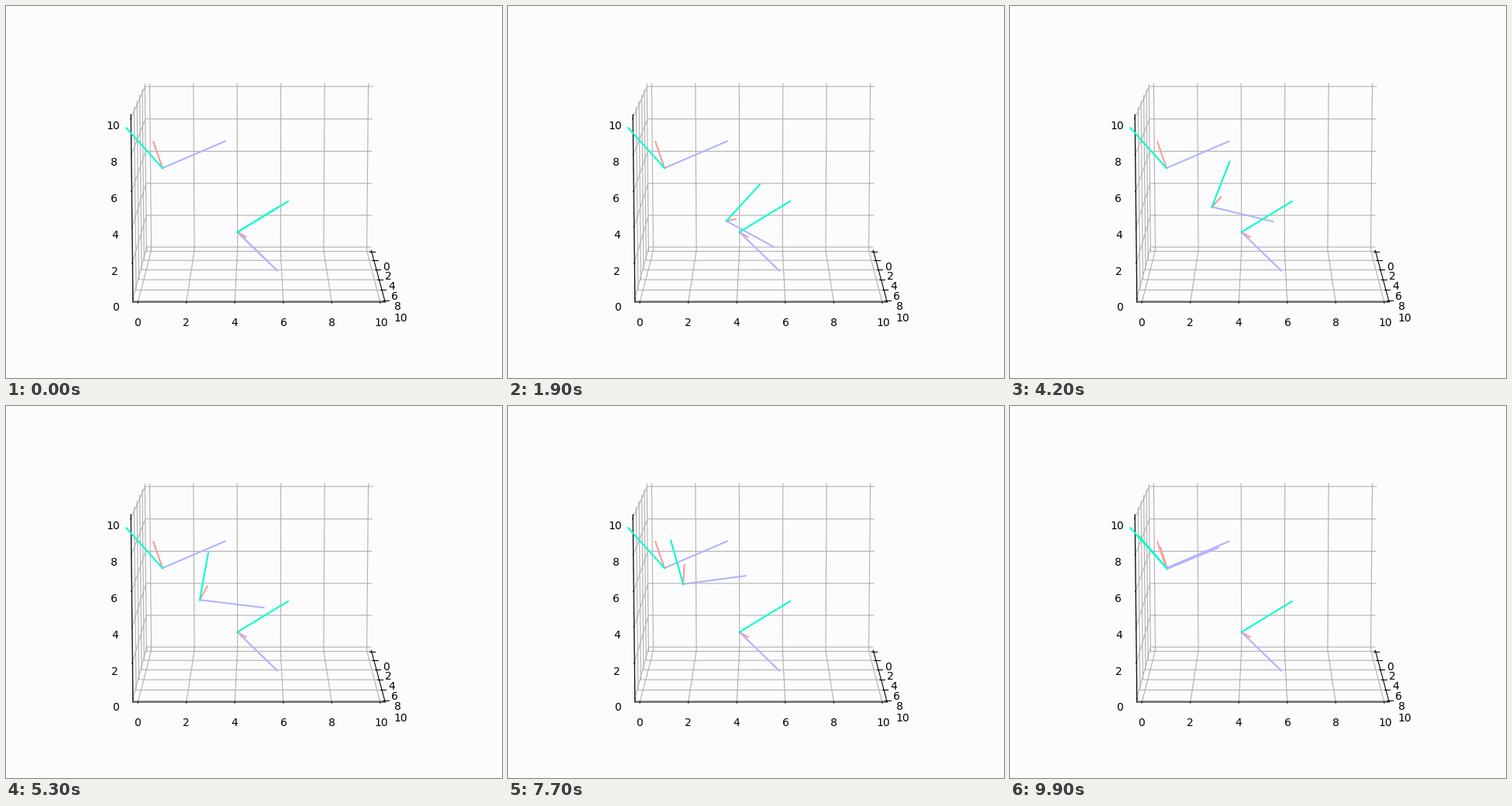
Write a matplotlib script that moves like this. It is 640 px wide and 480 px high and loops after 10 s.

```python
import numpy as np
import matplotlib.pyplot as plt
from matplotlib.animation import FuncAnimation

FRAMES = 100
BACK = "#fcfcfc"
COLORS = ("#ff9999", "#00ffcc", "#b2b2ff")
ORDER = (2.0, 2.2, 2.1)
SWEEP = np.radians(63.5)  # wider than the true angle, so the axes stretch midway

START = np.array([0.0, 4.0, 1.0])
END = np.array([9.0, 1.0, 7.0])


def zyz(phi, theta, psi):
    """Quaternion (w, x, y, z) of ZYZ Euler angles in degrees."""
    a, b, c = np.radians([phi, theta, psi]) / 2
    return np.array([
        np.cos(b) * np.cos(a + c),
        -np.sin(b) * np.sin(a - c),
        np.sin(b) * np.cos(a - c),
        np.cos(b) * np.sin(a + c),
    ])


def axes_of(q):
    """Rotation matrix of q, scaled by its squared norm."""
    w, x, y, z = q
    return np.array([
        [w*w + x*x - y*y - z*z, 2 * (x*y - w*z), 2 * (x*z + w*y)],
        [2 * (x*y + w*z), w*w - x*x + y*y - z*z, 2 * (y*z - w*x)],
        [2 * (x*z - w*y), 2 * (y*z + w*x), w*w - x*x - y*y + z*z],
    ])


def blend(qa, qb, s):
    return (np.sin((1 - s) * SWEEP) * qa + np.sin(s * SWEEP) * qb) / np.sin(SWEEP)


Q_START = zyz(60, 135, 60)
Q_END = zyz(90, 60, 110)

fig = plt.figure(figsize=(6.4, 4.8), dpi=100, facecolor=BACK)
ax = fig.add_axes([0, 0, 1, 1], projection="3d", facecolor=BACK)
ax.view_init(elev=10, azim=1e-4)

pad = 10 / 48
ticks = range(0, 11, 2)
ax.set(xlim=(-pad, 10 + pad), ylim=(-pad, 10 + pad), zlim=(-pad, 10 + pad),
       xticks=ticks, yticks=ticks, zticks=ticks)
for axis in (ax.xaxis, ax.yaxis, ax.zaxis):
    axis.set_pane_color((1, 1, 1, 0))


def make_triad():
    return [ax.plot([], [], [], color=c, lw=1.5, zorder=z)[0]
            for c, z in zip(COLORS, ORDER)]


def place(triad, origin, q, length):
    for line, axis in zip(triad, axes_of(q).T):
        line.set_data_3d(*np.transpose([origin, origin + length * axis]))


place(make_triad(), START, Q_START, 3)
place(make_triad(), END, Q_END, 3)
mover = make_triad()


def update(i):
    s = i / FRAMES
    place(mover, START + s * (END - START), blend(Q_START, Q_END, s), 2.4)
    return mover


anim = FuncAnimation(fig, update, frames=FRAMES, interval=100,
                     repeat=True, repeat_delay=0, blit=False)
plt.show()
```
